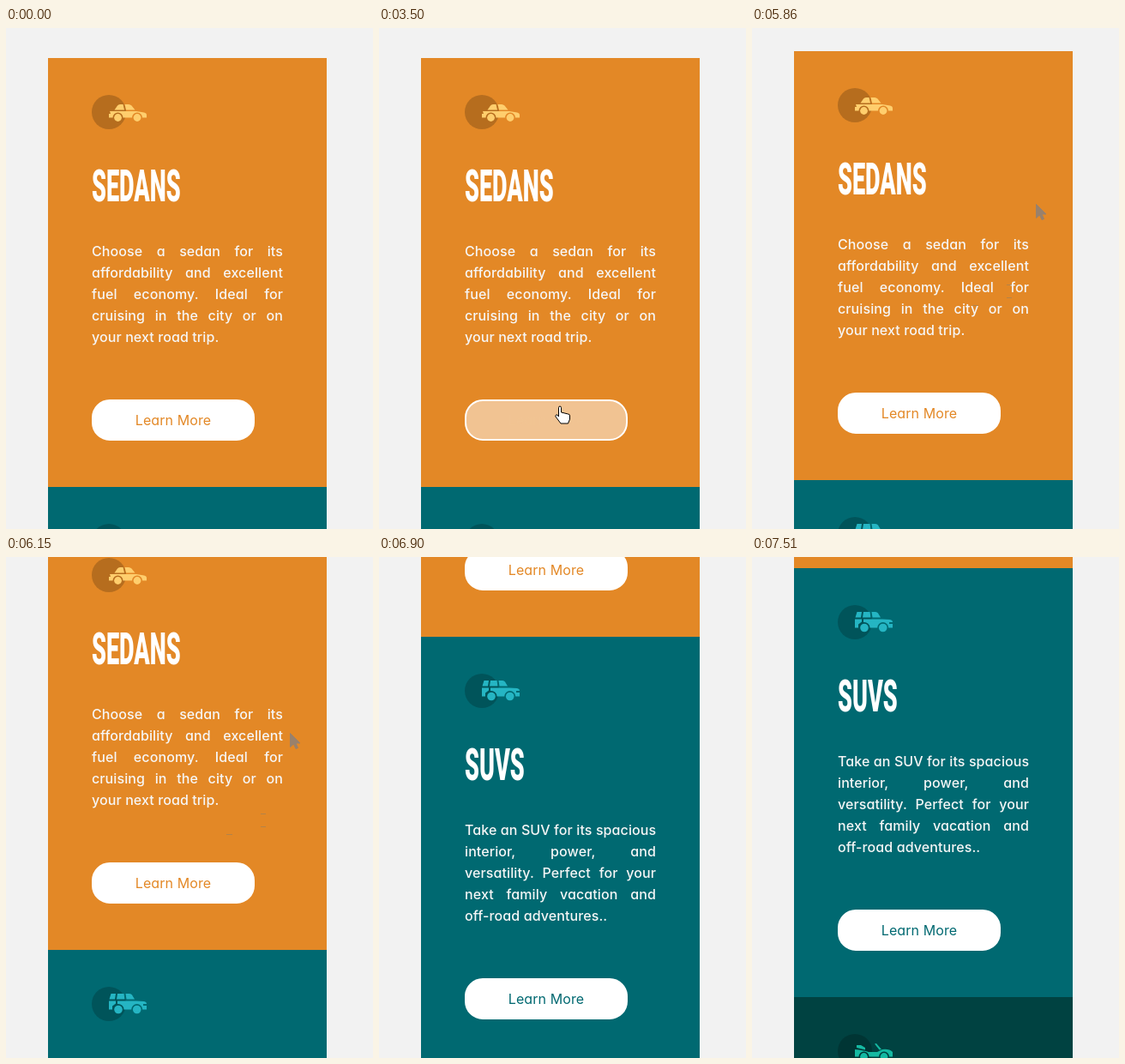
An HTML page that plays this animation: 428 by 584 pixels, repeating every 8 s.

```html
<!DOCTYPE html>
<html lang="en">
<head>
<meta charset="utf-8">
<title>Car cards</title>
<style>
  html, body { margin: 0; width: 100%; height: 100%; overflow: hidden; background: #f2f2f2; }
  #stage { position: relative; width: 428px; height: 584px; overflow: hidden; }
  #page { position: absolute; left: 49px; top: 35px; width: 325px; }
  .card { --hover: 0%; position: relative; height: 500px; background: var(--tone); }
  .card > * { position: absolute; left: 51px; margin: 0; }
  .icon { top: 43px; fill: var(--car); }
  .icon circle:first-child { fill: #000; opacity: .2; }
  h2 {
    top: 124px; color: #fff; font: 900 51px/51px Roboto, sans-serif; white-space: nowrap;
    transform: scaleX(.53); transform-origin: 0 0;
  }
  .text {
    top: 213px; width: 223px; color: #f6f6f6; font: 500 16px/25px Inter, sans-serif;
    font-feature-settings: "cv11"; letter-spacing: .1px; white-space: nowrap;
  }
  .text div { text-align-last: justify; }
  .text div:last-child { text-align-last: left; }
  .button {
    top: 398px; width: 190px; height: 48px; box-sizing: border-box;
    border: 2px solid #fff; border-radius: 21px; text-align: center;
    font: 400 16px/44px Inter, sans-serif; font-feature-settings: "cv11"; letter-spacing: .1px;
    background: color-mix(in srgb, var(--tone) var(--hover), #fff);
    color: color-mix(in srgb, #fff var(--hover), var(--tone));
  }
  #overlay { position: absolute; inset: 0; }
</style>
</head>
<body>
<div id="stage">
  <div id="page"></div>
  <svg id="overlay" width="428" height="584">
    <g fill="none" stroke="#96815f">
      <path id="arrowTrail" fill="#99816c" stroke="#99816c"
        d="M331.5 205.5V221.5L335.5 218L338 223.5L340.5 222.5L338 217H343Z"/>
      <path id="beamTrail" opacity=".6" d="M297 299.5h6M297 314.5h6M257 323.5h7"/>
    </g>
    <g id="pointer" stroke="#000" fill="#fff" stroke-linejoin="round">
      <path data-kind="arrow" d="M.5.5V16.500L4.500 12.800L7 18.500L9.400 17.500L7 12H11.500Z"/>
      <path data-kind="beam" fill="none" d="M-3 -8.500h2.500l.5.500l.5-.5h2.500M0 -8V7M-3 7.500h2.500l.5-.5l.5.500h2.500"/>
      <path data-kind="hand" d="M-1.500 10V1.500a1.500 1.500 0 0 1 3 0V7l8 2a2 2 0 0 1 2 2v4l-2 5H1L-5 12a1.500 1.500 0 0 1 2-2l1.500 2Z"/>
    </g>
  </svg>
</div>
<script>
const LOOP = 8000;
const $ = id => document.getElementById(id);

const cards = [
  {
    tone: '#e38826', car: '#ffce6d', title: 'Sedans', wheels: [30.5, 53], hub: 4.4,
    lines: ['Choose a sedan for its', 'affordability and excellent', 'fuel economy. Ideal for',
      'cruising in the city or on', 'your next road trip.'],
    shape: `M26.500 17.500L30 12.500Q31 11 33 11H36.500L38 17.500ZM38.500 11H43Q45 11 46.500 12.500L50.500 17.500H40Z
      M21 19H52L61 20.500Q64 21 64 23.500V26.500H59A6 6 0 0 0 47 26.500H36.500A6 6 0 0 0 24.500 26.500H20V22H22Z`
  },
  {
    tone: '#006971', car: '#25b5c3', title: 'SUVs', wheels: [31, 52.7], hub: 4.8,
    lines: ['Take an SUV for its spacious', 'interior, power, and', 'versatility. Perfect for your',
      'next family vacation and', 'off-road adventures..'],
    shape: `M22.500 8H28L27 14.500H20.500ZM30 8H37.500L38.500 14.500H29ZM39.500 8H44Q46 8 47 9.500L50 14.500H40.500Z
      M20 16.500H28V19.500L24 22.500V26.500H20ZM30 16.500H52L61 17Q64 17.500 64 20H60V22H64V26.500H59.200
      A6.500 6.500 0 0 0 46.200 26.500H37.500A6.500 6.500 0 0 0 30 20Z`
  },
  {
    tone: '#004241', car: '#15b9a2', wheels: [30.5, 54], hub: 4.4,
    shape: `M22 13H27L32 16V18.500L22 16ZM43 11.500L45 11L51 18L48.500 18.500Z
      M20 18Q30 19 36 21H46L52 18Q60 17 64 21V26.500H60A6 6 0 0 0 48 26.500H36.500A6 6 0 0 0 24.500 26.500H20Z`
  }
];

$('page').innerHTML = cards.map(c => `
  <section class="card" style="--tone:${c.tone};--car:${c.car}">
    <svg class="icon" width="64" height="40">
      <circle cx="20" cy="20" r="20"/><path d="${c.shape}"/>
      ${c.wheels.map(x => `<circle cx="${x}" cy="26.500" r="${c.hub}"/>`).join('')}
    </svg>
    ${c.title ? `<h2>${c.title.toUpperCase()}</h2>
    <div class="text">${c.lines.map(l => `<div>${l}</div>`).join('')}</div>
    <div class="button">Learn More</div>` : ''}
  </section>`).join('');

const firstCard = document.querySelector('.card');
const pointerKinds = [...$('pointer').children];

// start, end, number of visible steps, scroll before, scroll after
const scrolls = [
  [5860, 6150, 5, 0, 77],
  [6350, 6900, 9, 77, 442],
  [7100, 7510, 7, 442, 522]
];

// time, x, y, kind; the pointer advances in short steps towards the next row
const pointerPath = [
  [2320, 415, 94, 'arrow'],
  [2660, 331, 205, 'arrow'],
  [2750, 310, 250, 'beam'],
  [3090, 231, 374, 'arrow'],
  [3160, 230, 380, 'arrow'],
  [3370, 216, 436, 'hand'],
  [3580, 202, 452, 'hand'],
  [4180, 260, 315, 'beam'],
  [4250, 300, 307, 'beam'],
  [4320, 331, 205, 'arrow'],
  [4390, 416, 123, 'arrow'],
  [4450]
];

const clamp = v => Math.max(0, Math.min(1, v));
const mix = (a, b, p) => a + (b - a) * p;
const ease = p => .5 - .5 * Math.cos(Math.PI * p ** .99);

function scrollAt(t) {
  let y = 0;
  for (const [start, end, steps, from, to] of scrolls) {
    if (t < start) break;
    const gap = (end - start) / (steps - 1);
    const step = Math.min(steps, Math.floor((t - start + 5) / gap) + 1);
    y = Math.round(mix(from, to, ease(step / steps)));
  }
  return y;
}

function pointerAt(t) {
  if (t >= 270 && t < 340) return [427, -6, 'arrow'];
  if (t < 2320 || t >= 4450) return null;
  const i = pointerPath.findIndex(row => row[0] > t) - 1;
  const [start, x, y, kind] = pointerPath[i];
  const [end, nextX, nextY] = pointerPath[i + 1];
  if (start >= 3580) return [x, y, kind];
  const p = Math.floor((t - start) / 70) * 70 / (end - start);
  return [Math.round(mix(x, nextX, p)), Math.round(mix(y, nextY, p)), kind];
}

function render(t) {
  $('page').style.transform = `translateY(${-scrollAt(t)}px)`;

  const hover = clamp((t - 3350) / 300) - clamp((t - 4160) / 250);
  firstCard.style.setProperty('--hover', `${(hover * 100).toFixed(1)}%`);

  const pointer = pointerAt(t);
  $('pointer').style.display = pointer ? '' : 'none';
  if (pointer) {
    const [x, y, kind] = pointer;
    $('pointer').setAttribute('transform', `translate(${x} ${y})`);
    for (const k of pointerKinds) k.style.display = k.dataset.kind === kind ? '' : 'none';
  }

  $('arrowTrail').style.display = t >= 4390 && t < 6685 ? '' : 'none';
  $('beamTrail').style.display = t >= 4320 && t < 6350 ? '' : 'none';
}

const begin = performance.now();
function tick() {
  render((performance.now() - begin) % LOOP);
  requestAnimationFrame(tick);
}
tick();
</script>
</body>
</html>
```
